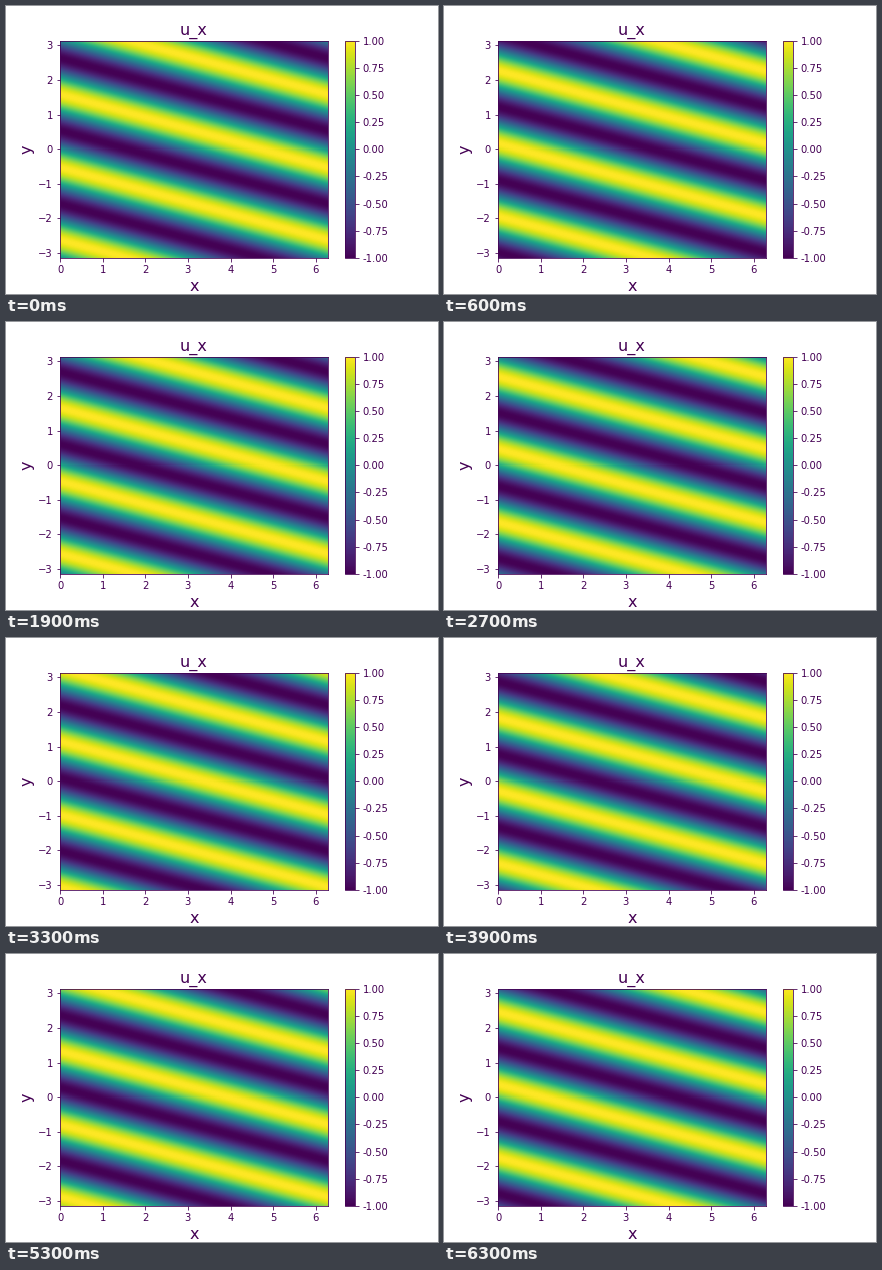
Recreate the animation shown at these times as a matplotlib script. Size 432 px wide and 288 px high, loop 6400 ms.

```python
import numpy as np
import matplotlib.pyplot as plt
from matplotlib.animation import FuncAnimation

FRAMES = 64
INTERVAL = 100
PHASE_STEP = 0.341  # radians the wave advances per frame
INK = "#440154"

plt.rcParams.update({
    "font.family": "DejaVu Sans",
    "font.size": 10,
    "text.color": INK,
    "axes.labelcolor": INK,
    "axes.edgecolor": INK,
    "xtick.color": INK,
    "ytick.color": INK,
})

x = (np.arange(268) + 0.5) / 268 * 2 * np.pi
y = (np.arange(217) + 0.5) / 217 * 2 * np.pi - np.pi
X, Y = np.meshgrid(x, y)


def wave(frame):
    return -np.sin(X + 3 * Y - PHASE_STEP * frame)


fig, ax = plt.subplots(figsize=(6, 4), dpi=72)
fig.subplots_adjust(left=0.125, right=0.9, bottom=0.125, top=0.88)

image = ax.imshow(wave(0), origin="lower", aspect="auto", cmap="viridis",
                  vmin=-1, vmax=1, interpolation="nearest",
                  extent=(0, 2 * np.pi, -np.pi, np.pi))
ax.set_xticks(range(7))
ax.set_yticks(range(-3, 4))
ax.set_title("u_x", fontsize=16)
ax.set_xlabel("x", fontsize=16)
ax.set_ylabel("y", fontsize=16)
fig.colorbar(image, ax=ax, ticks=np.linspace(-1, 1, 9), format="%.2f")


def update(frame):
    image.set_data(wave(frame))
    return [image]


anim = FuncAnimation(fig, update, frames=FRAMES, interval=INTERVAL,
                     repeat=True, repeat_delay=0)
plt.show()
```
